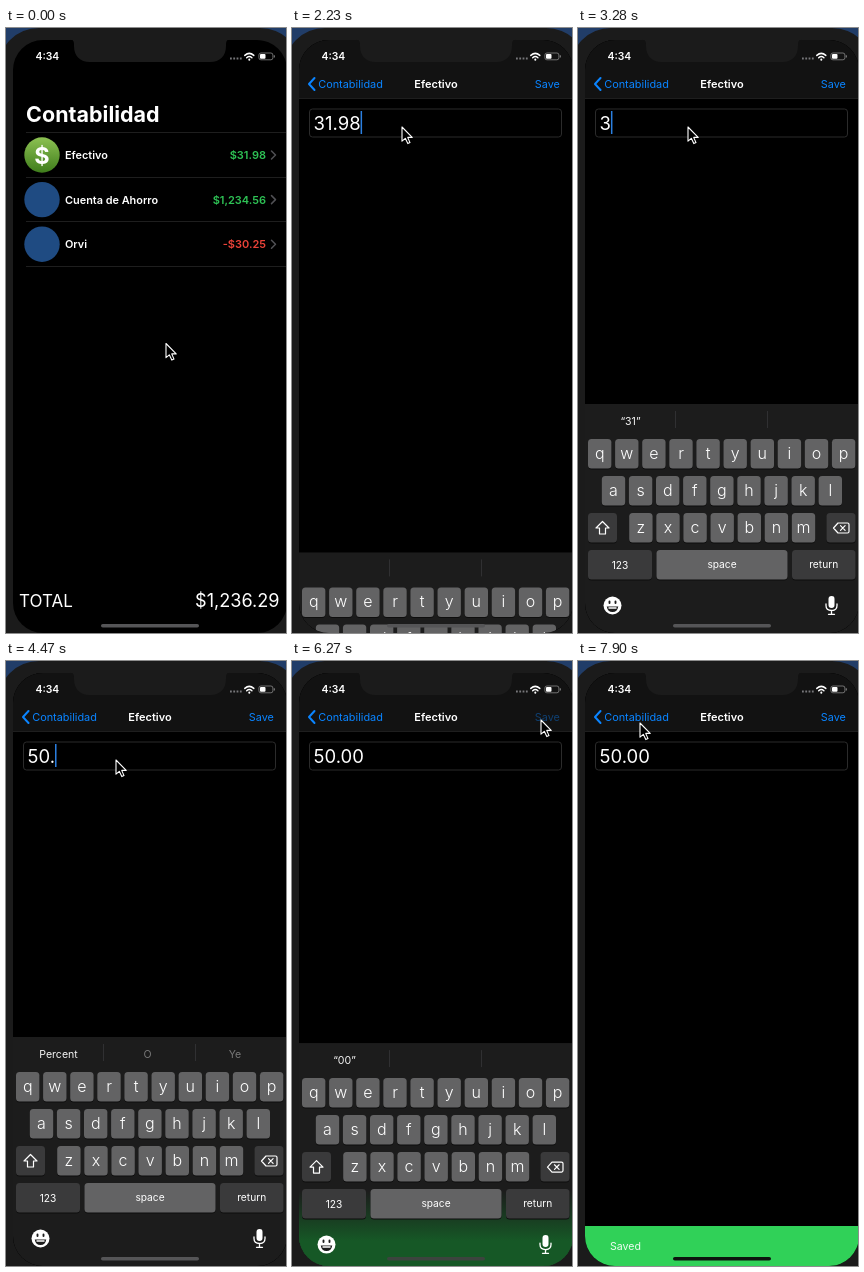
Recreate the animation shown at these times as an HTML page. Size 280 px wide and 605 px high, loop 8 s.

```html
<!DOCTYPE html>
<html lang="es">
<head>
<meta charset="utf-8">
<title>Contabilidad</title>
<style>
  html, body { margin: 0; width: 100%; height: 100%; overflow: hidden; background: #1b1b1b; }
  svg { display: block; width: 280px; height: 605px; font-family: Inter, Roboto, sans-serif; font-size: 11px; fill: #fff; }
  .semi { font-weight: 600; }
  .end { text-anchor: end; }
  .mid { text-anchor: middle; }
  .letter { font-weight: 300; }
  .line { fill: none; stroke-linecap: round; stroke-linejoin: round; }
</style>
</head>
<body>
<svg viewBox="0 0 280 605">
  <defs>
    <clipPath id="screen"><rect x="7" y="12" width="274" height="593" rx="30"/></clipPath>
    <linearGradient id="cash" x2="0" y2="1"><stop stop-color="#8cc152"/><stop offset="1" stop-color="#3f7d1c"/></linearGradient>
    <linearGradient id="glow" gradientUnits="userSpaceOnUse" x1="0" y1="530" x2="0" y2="580">
      <stop stop-color="#165826" stop-opacity="0"/><stop offset="1" stop-color="#165826"/>
    </linearGradient>
  </defs>
  <rect width="280" height="605" fill="#213d68"/>
  <rect x="-8" y="0" width="303" height="640" rx="41" fill="#1b1b1b"/>
  <g clip-path="url(#screen)">
    <rect x="7" y="12" width="273" height="593" fill="#000"/>
    <g id="list"></g>
    <g id="total">
      <text x="13" y="579" font-size="17">TOTAL</text>
      <text x="273.600" y="579" font-size="18.100" class="end">$1,236.29</text>
    </g>
    <g id="page">
      <rect x="7" y="12" width="274" height="593" fill="#000"/>
      <rect x="7" y="12" width="274" height="58" fill="#121212"/>
      <rect x="7" y="70" width="274" height="1" fill="#1e1e1e"/>
      <rect x="17.500" y="81" width="252" height="28" rx="3" fill="#000" stroke="#2b2b2b"/>
      <text id="value" x="21.500" y="101.500" font-size="18.500"></text>
      <rect id="caret" y="83" width="1.500" height="23" fill="#2b7fe0"/>
    </g>
    <g id="nav">
      <path id="back" class="line" d="M22.500 50 17 56l5.500 6" stroke="#0a84ff" stroke-width="2"/>
      <text id="heading" class="semi mid" y="60">Efectivo</text>
      <text id="save" class="end" x="267.800" y="60" font-size="10.800" fill="#0a84ff">Save</text>
    </g>
    <text id="title">Contabilidad</text>
    <g id="toast">
      <rect x="7" y="565" width="274" height="40" fill="#30d158"/>
      <text x="32" y="588.500" font-size="10.600" fill="#eefbf1">Saved</text>
    </g>
    <rect id="board" x="7" width="274" height="240" fill="#1c1c1c"/>
    <rect id="tint" x="7" width="274" fill="url(#glow)"/>
    <g id="keys"></g>
    <rect id="home" x="95" y="596" width="98" height="3.500" rx="1.750"/>
  </g>
  <path d="M63 11q5 0 5 5v2c0 10 6 16 16 16h120c10 0 16-6 16-16v-2q0-5 5-5z" fill="#1b1b1b"/>
  <text x="29.500" y="32.300" font-size="10.400" class="semi">4:34</text>
  <path d="M224 30.500h12" stroke="#77777a" stroke-width="1.800" stroke-dasharray="1.800 1.500"/>
  <g class="line" stroke="#fff" stroke-width="1.500">
    <path d="M238.800 27.400q4.500-4 9 0M240.700 29.700q2.600-2.300 5.200 0"/>
    <path d="M243.300 31.600v.1" stroke-width="2"/>
  </g>
  <rect x="252.900" y="25" width="14" height="6.800" rx="2" fill="none" stroke="#8a8a8a" stroke-width=".8"/>
  <rect x="254" y="26.100" width="5.500" height="4.600" rx="1"/>
  <path d="M268.300 27.300v2.200" stroke="#8a8a8a"/>
  <path id="cursor" d="M0 0V14.200L3.300 11.300 5.800 16.600 8 15.600 5.700 10.400H10.200Z" fill="#000" stroke="#fff" stroke-width="1.100" stroke-linejoin="round"/>
</svg>
<script>
const LOOP = 8000, TICK = 149.2;
const $ = id => document.getElementById(id);
const set = (node, attrs) => { for (const name in attrs) node.setAttribute(name, attrs[name]); };
const clamp = v => Math.max(0, Math.min(1, v));
const mix = (a, b, p) => a + (b - a) * p;
const move = (x, y = 0) => `translate(${x} ${y})`;

// Critically damped settle; phase is how far it has run at its first tick.
function spring(tick, start, phase) {
  if (tick < start) return 0;
  const x = phase + 2.73 * (tick - start);
  return 1 - (1 + x) * Math.exp(-x);
}

// Last entry whose tick has been reached.
const at = (track, tick) => track.filter(entry => entry[0] <= tick).pop().slice(1);

function buildList() {
  const rows = [
    ['Efectivo', '$31.98', '#2ec255', 'url(#cash)'],
    ['Cuenta de Ahorro', '$1,234.56', '#2ec255', '#1f4b82'],
    ['Orvi', '-$30.25', '#ea4238', '#1f4b82']
  ];
  const separator = y => `<rect x="20" y="${y}" width="300" height="1" fill="#1e1e1e"/>`;
  $('list').innerHTML = '<rect id="pressed" x="0" y="105" width="330" height="44.500" fill="#39393b"/>' + separator(104) +
    rows.map(([name, amount, color, icon], i) => {
      const y = 127 + i * 44.6;
      return `<circle cx="36" cy="${y}" r="17.700" fill="${icon}"/>
        ${i ? '' : `<text x="36" y="${y + 8.5}" font-size="23.500" font-weight="700" class="mid">$</text>`}
        <text x="59" y="${y + 4}" font-size="10.900" class="semi">${name}</text>
        <text x="260" y="${y + 4}" class="semi end" fill="${color}">${amount}</text>
        <path class="line" d="M265.500 ${y - 4}l4 4-4 4" stroke="#505054" stroke-width="1.500"/>
        ${separator(Math.floor(y + 22))}`;
    }).join('');
}

function buildKeys() {
  const key = (x, y, w, fill, id = '') =>
    `<rect x="${x}" y="${y + 1}" width="${w}" height="29.500" rx="3.500" fill="#0d0d0d"/>
     <rect ${id} x="${x}" y="${y}" width="${w}" height="29.500" rx="3.500" fill="${fill}"/>`;
  const label = (x, y, text, size, cls = '') =>
    `<text class="mid ${cls}" x="${x}" y="${y}" font-size="${size}">${text}</text>`;
  const rows = [['qwertyuiop', 10], ['asdfghjkl', 23.8], ['zxcvbnm', 51.2]];
  let out = '<path d="M97.500 383v17M189.500 383v17" stroke="#303032"/>';
  for (let i = 0; i < 3; i++) out += label([52.5, 141.5, 229][i], 397, '', 10.6, 'hint');
  rows.forEach(([letters, left], r) => [...letters].forEach((letter, i) => {
    const x = left + i * 27.1, y = 411 + r * 37;
    out += key(x, y, 23.4, '#636364') + label(x + 11.7, y + 19.8, letter, 16, 'letter');
  }));
  out += key(10, 485, 29, '#3a3a3b', 'id="shift"') + key(248.5, 485, 29, '#3a3a3b') +
    key(10, 522, 64, '#3a3a3b') + key(78.5, 522, 131, '#636364') + key(214, 522, 63.5, '#3a3a3b') +
    label(42, 540.5, '123', 10.2) + label(144, 540, 'space', 10.2) + label(245.7, 540, 'return', 10.2) +
    `<path id="arrow" class="line" d="M24.500 493.500l6.500 6.500h-3.500v6h-6v-6H18z" stroke="#fff" stroke-width="1.200"/>
     <path class="line" d="M260 495h9.500q1.500 0 1.500 1.500v7q0 1.500-1.500 1.500H260l-4.500-5zM262.500 497.700l4.600 4.600m0-4.600l-4.600 4.600" stroke="#fff" stroke-width="1.200"/>
     <circle cx="34.500" cy="577.500" r="9"/>
     <path d="M28.700 578.500h11.600q-1 5.500-5.800 5.500t-5.800-5.500z" fill="#1c1c1c"/>
     <path class="line" d="M31.500 573.500v1.500M37.500 573.500v1.500" stroke="#1c1c1c" stroke-width="1.900"/>
     <path d="M30.500 580h8" stroke="#fff" stroke-width="1.400"/>
     <rect x="250.500" y="568" width="6" height="12" rx="3"/>
     <path class="line" d="M248 576v1.500q0 5 5.500 5t5.500-5V576M253.500 582.500v3.500M250.500 586.300h6" stroke="#fff" stroke-width="1.300"/>`;
  $('keys').innerHTML = out;
}

const typed = [
  [0, '31.98'], [18, '31.9'], [19, '31.'], [20, '31'], [22, '3'], [23, ''],
  [26, '5'], [27, '50'], [30, '50.'], [31, '50.0'], [32, '50.00']
];
const hints = [
  [0, '', '', ''], [18, '“9”', '', ''], [19, '', '', ''], [21, '“31”', '', ''], [23, '“3”', '', ''],
  [24, 'I', 'The', 'I’m'], [26, '“5”', '', ''], [28, '“50”', '', ''],
  [30, 'Percent', 'O', 'Ye'], [31, 'Percent', 'O’clock', 'Years'], [32, '“0”', '', ''], [33, '“00”', '', '']
];
// Pointer legs: start tick, end tick, destination.
const legs = [[2, 5, 147, 135], [8, 12, 110, 99], [35, 40, 249, 59], [42, 48, 140, 121], [48, 53, 62, 62]];

function pointer(tick) {
  let x = 160, y = 315.5;
  for (const [from, to, toX, toY] of legs) {
    const p = clamp((tick - from) / (to - from));
    const eased = p * p * (3 - 2 * p);
    x = mix(x, toX, eased);
    y = mix(y, toY, eased);
  }
  return move(x, y);
}

function drawPush(tick) {
  const push = tick >= 12 ? 1 : spring(tick, 8, 1.54);
  const shrink = push ** 1.15;
  set($('list'), { transform: move(-76 * push) });
  set($('total'), { transform: move(-83 * push) });
  set($('pressed'), { visibility: tick >= 8 ? 'visible' : 'hidden' });
  set($('page'), { transform: move(273 * (1 - push)) });
  set($('nav'), { visibility: push ? 'visible' : 'hidden' });
  set($('back'), { opacity: clamp(push * 3 - 2) });
  set($('heading'), { x: 144 + 131 * (1 - push), opacity: push });
  set($('save'), { opacity: tick === 42 ? 0.4 : tick === 43 ? 0.7 : push });
  set($('title'), {
    x: mix(20.1, 26.2, push), y: mix(94, 60, push) + 8 * push * (1 - push),
    'font-size': mix(21.5, 10.9, shrink), 'font-weight': push < 0.7 ? 700 : 400,
    fill: `rgb(${mix(255, 10, push)},${mix(255, 132, push)},255)`,
    opacity: 1 - push * (1 - push)
  });
}

function drawKeyboard(tick) {
  const shown = spring(tick, 15, 1.24), gone = spring(tick, 42, 0.25);
  const drop = tick >= 46 ? 240 : 229 * (1 - shown + gone);
  const saved = tick >= 42, upper = tick >= 23 && tick < 26;
  const top = 376 + drop, tintTop = Math.max(530, top);
  set($('board'), { y: top });
  set($('keys'), { transform: move(0, drop) });
  set($('toast'), { visibility: saved ? 'visible' : 'hidden' });
  set($('tint'), { y: tintTop, height: Math.max(0, 605 - tintTop), visibility: saved ? 'visible' : 'hidden' });
  set($('home'), { fill: tick > 43 ? '#0c140e' : saved ? '#3c443e' : '#555557' });
  set($('shift'), { fill: upper ? '#d6d6d8' : '#3a3a3b' });
  set($('arrow'), { fill: upper ? '#000' : 'none', stroke: upper ? '#000' : '#fff' });
  document.querySelectorAll('.letter').forEach(node => {
    node.textContent = upper ? node.textContent.toUpperCase() : node.textContent.toLowerCase();
  });
  const words = at(hints, tick);
  document.querySelectorAll('.hint').forEach((node, i) => {
    node.textContent = words[i];
    set(node, { opacity: tick === 30 && i ? 0.4 : 0.95 });
  });
}

function drawField(tick) {
  const value = $('value');
  value.textContent = at(typed, tick)[0];
  const blinkOff = tick >= 37 && tick <= 39;
  set($('caret'), {
    x: 21.5 + (value.textContent ? value.getComputedTextLength() : 0),
    visibility: tick >= 15 && tick < 42 && !blinkOff ? 'visible' : 'hidden'
  });
}

function draw(ms) {
  const tick = Math.floor((ms % LOOP + 8) / TICK);
  drawPush(tick);
  drawKeyboard(tick);
  drawField(tick);
  set($('cursor'), { transform: pointer(tick) });
}

buildList();
buildKeys();
const start = performance.now();
function loop() {
  draw(performance.now() - start);
  requestAnimationFrame(loop);
}
loop();
</script>
</body>
</html>
```
